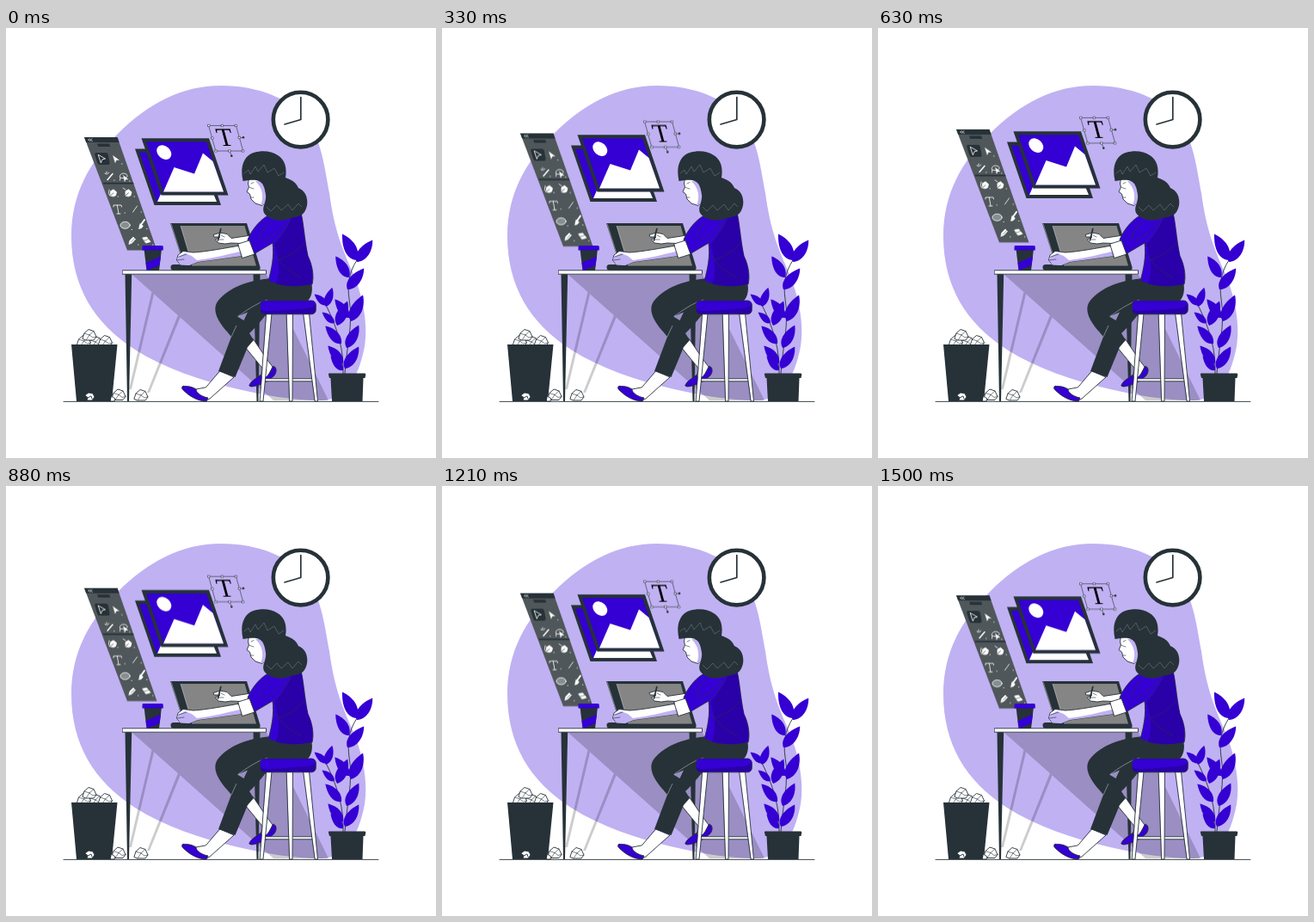
Animation of 500 by 500 pixels, one loop 1.54 s. Source, as an HTML page:

```html
<!DOCTYPE html>
<html lang="en">
<head>
<meta charset="utf-8">
<title>Designer at work</title>
<style>
  html, body { margin: 0; width: 100%; height: 100%; overflow: hidden; background: #fff; }
  svg { display: block; width: 100vw; height: 100vh; }
  .ink { fill: #263238; }
  .hue { fill: #3500d3; }
  .deep { fill: #2a00a9; }
  .pale { fill: #c0b1f3; }
  .white { fill: #fff; }
  .line { stroke: #263238; stroke-width: .9; stroke-linejoin: round; stroke-linecap: round; }
  .fine { stroke-width: .6; }
  .bold { stroke-width: 1.7; }
  .open { fill: none; }
  .shade { fill: #000; fill-opacity: .2; }
  .icons { fill: none; stroke: #fff; stroke-width: .8; stroke-linejoin: round; stroke-linecap: round; }
  .solid { fill: #fff; }
  .float { --rise: -9.3px; animation: float 1540ms infinite; }
  .short { --rise: -8.2px; }
  @keyframes float {
    0% { transform: translateY(0); animation-timing-function: cubic-bezier(.39, 0, .55, 1); }
    45.6% { transform: translateY(var(--rise)); animation-timing-function: cubic-bezier(.42, 0, .58, 1); }
    97.4%, 100% { transform: translateY(.2px); }
  }
</style>
</head>
<body>
<svg viewBox="0 0 500 500" xmlns="http://www.w3.org/2000/svg">
  <defs>
    <path id="leaf" d="M0 0C-9 -5 -9 -18 -1 -32C7 -22 9 -8 0 0Z"/>
    <g id="paper">
      <path class="white line" d="M-8 4L-6 -2L-1 -6.5L5 -4.5L8 2L5 6H-4Z"/>
      <path class="open line fine" d="M-6 -2L0 0L5 -4.5M0 0L-4 6M0 0L4 3L8 2"/>
    </g>
    <rect id="knob" class="white line fine" x="-1.1" y="-1.1" width="2.2" height="2.2"/>
    <g id="nib">
      <path class="solid" d="M-3.5 3L-3.5 -2L0 -4L3.5 -1L2.5 3L0 4Z"/>
      <path stroke="#50575a" d="M-3.5 3L0 0"/>
    </g>
  </defs>

  <path class="pale" d="M76 242C76 192 98 155 130 123C165 88 204 67 250 67C293 67 333 82 353 112C368 136 371 166 376 192C382 236 391 256 403 284C416 314 421 347 417 370C410 408 393 433 367 433C334 433 300 427 270 420C226 410 185 396 150 374C102 343 76 300 76 242Z"/>
  <path class="shade" d="M147 287H303L375 433H311Z"/>
  <path class="shade" d="M169.5 307L172 309.5L146 420H143ZM200 334L202.5 336.5L167 424H164Z"/>
  <path class="open line" d="M67 434.4H433"/>

  <!-- clock -->
  <circle class="white" cx="342.6" cy="106.6" r="31.8" stroke="#263238" stroke-width="4.6"/>
  <path class="open line bold" d="M342.8 80.5V106.5L324 112"/>

  <!-- tool panel -->
  <g class="float">
    <path fill="#50575a" d="M91 127H129.5L175.5 258.5H141Z"/>
    <path class="ink" d="M91 127H129.5L131.6 133H93.2ZM106 134.5H120L121.3 138H107.3ZM112.5 179.7H148L148.6 181.4H113.2Z"/>
    <path class="ink" d="M105 145H116Q118 145 118.8 147L120.5 156.5Q121 159 118 159H109Q107 159 106.3 157L103.3 147.5Q102.8 145 105 145Z"/>
    <g class="icons">
      <path stroke-width=".6" d="M97.5 128.8L95.5 130L98 131.5M100 128.8L98 130L100.5 131.5"/>
      <path d="M107.5 147.5L115.5 152L112 152.8L110.5 156.5Z"/>
      <path class="solid" d="M124.5 148.5L131.5 153.5L128.5 153.5L127 156.5Z" stroke-width=".3"/>
      <path stroke-width="1.5" d="M118 176.5L124 169.5"/>
      <path d="M115 169L117 170M117 167V169M119.5 168L118.5 169.5"/>
      <path d="M132.5 174C131 169.5 137 167.5 140.5 170.5C143 174 137 175.5 133 174L132.5 177"/>
      <path class="solid" d="M136.5 171.5L142 176L139.3 176L138 178.5Z" stroke-width=".3"/>
      <use href="#nib" x="125" y="191.8"/>
      <use href="#nib" x="142.5" y="191.8"/>
      <path d="M120 188Q118.500 192 120.500 195M139 188L136 186"/>
      <path d="M125 208V206H134L134.500 208M129.300 206L131 216M129 216H133"/>
      <path d="M147.500 214L152.500 207"/>
      <ellipse cx="138.600" cy="229.300" rx="5.600" ry="4" fill="#888e90"/>
      <path stroke-width="2" d="M157.500 228L161 223"/>
      <path class="solid" d="M156 227.500L159.500 230C158.500 233 156 233.500 154 233.500C155.500 232 154.500 229 156 227.500Z" stroke-width=".3"/>
      <path class="solid" d="M143 251L144 247L148 243L150.500 245.500L146.500 250Z"/>
      <path stroke="#50575a" stroke-width=".6" d="M145.500 249L149.500 244.500"/>
      <path class="solid" d="M159 244L163.500 243L168 248.500L163 250Z"/>
      <path stroke="#50575a" stroke-width=".6" d="M161 247L166 245.500"/>
      <path d="M134.500 158H135M125.500 177H126M143.500 178H144M130 196H130.500M149 196H149.500M138 215H138.500M157 214H157.500M146 234.500H146.500M163.500 233.500H164M153.500 252H154M170.500 252H171"/>
    </g>
  </g>

  <!-- pictures -->
  <g class="float short">
    <path class="ink" d="M150 140.500H228L250 206H172.500Z"/>
    <path class="hue" d="M155 144.500H225L244.500 202H175Z"/>
    <path class="white" d="M176 202L183 186L240 190L245 202Z"/>
    <path class="ink" d="M157.500 128.300H236L258.500 194.500H180.500Z"/>
    <path class="hue" d="M163 132.300H233L253 190.500H183Z"/>
    <path class="white" d="M183 190.500L195.500 162L219 169.500L229 145.500L240.500 155L253 190.500Z"/>
    <ellipse class="white" cx="183.800" cy="144.600" rx="9.500" ry="7.200" transform="rotate(42 183.800 144.600)"/>
  </g>

  <!-- type box -->
  <g class="float">
    <path class="open line fine" d="M236 113.500H267.500L275.700 143H244.200ZM271.500 127.500H275M260 143L262 148"/>
    <text transform="translate(248 137) skewX(15)" font-family="'Liberation Serif', serif" font-size="30">T</text>
    <use href="#knob" x="236" y="113.500"/><use href="#knob" x="251.500" y="113.500"/><use href="#knob" x="267.500" y="113.500"/>
    <use href="#knob" x="240" y="128"/><use href="#knob" x="244.200" y="143"/>
    <use href="#knob" x="260" y="143"/><use href="#knob" x="275.700" y="143"/><use href="#knob" x="271.500" y="127.500"/>
    <circle class="ink" cx="276" cy="127.300" r="1.300"/><circle class="ink" cx="262.300" cy="148.800" r="1.300"/>
  </g>

  <!-- bin and paper -->
  <use href="#paper" x="104" y="365"/><use href="#paper" x="90.500" y="364"/>
  <use href="#paper" x="115.500" y="364"/><use href="#paper" x="97" y="357"/>
  <path class="ink" d="M76 368H129.500L123 434H82Z"/>
  <path class="white line" d="M92 427L96 424L101 425L103 429L100 433H94L95 430Z"/>
  <path class="open line" d="M95 430L99 428L100 431"/>
  <use href="#paper" x="131" y="426.500"/><use href="#paper" x="157" y="427"/>
  <path class="white line" d="M122.500 428L127 431L126 434H121.500Z"/>

  <!-- plant -->
  <path class="open line" d="M394 402C396 370 404 345 399 315C397 300 398 285 408 270M392 402C393 375 386 350 372 322"/>
  <g class="hue" id="leaves"></g>
  <path class="ink" d="M375.500 401.500H417Q418.500 401.500 418.300 403L417.500 407H415.500L414.500 434H379L377.500 407H376L375 403Q374.800 401.500 375.500 401.500Z"/>

  <!-- desk -->
  <path class="ink" d="M138.500 286H146.200L143 434H141ZM287.500 286H295.500L293.500 434H291.500Z"/>
  <path class="ink" d="M191 227H280L295.500 278Q296 282 293 282H195Q191.500 282 191.500 278Q191.500 275 195 275H206.500Z"/>
  <path fill="#858585" d="M203 230H277.500L291 276.500H217Z"/>
  <path class="open" stroke="#fff" stroke-width=".4" d="M192 227.500L207 275M203 230L217 276.500"/>
  <rect class="white line" x="135.500" y="281.800" width="167" height="4.400"/>
  <path class="ink" d="M160.500 257H181L178 282H163.500Z"/>
  <path class="hue" d="M159.500 253H181.500Q182.800 253 182.800 255V258.500H158.500V255Q158.500 253 159.500 253ZM162.500 273L180 265.500L178.500 276L164 282Z"/>

  <!-- far foot -->
  <path class="white line" d="M276 368L287 361L304 386L310 394L304 406L295 408L299 397Z"/>
  <path class="hue line" d="M283 415.500C284 411 290 408 296 403.500C298 408 302 408 306 402L311 393C315 395 315 400 312 404C305 411 295 416 286 417Q282.500 417 283 415.500Z"/>

  <!-- near foot -->
  <path class="white line" d="M249 399L265 406L237 431L231 434L216 427L221 420L232 418Z"/>
  <path class="hue line" d="M206 416.500C213 416 218 418 221 420C221 425 229 429 235 430L233 434C223 434 213 428 206 421C204 419 204 417 206 416.500Z"/>

  <!-- trousers -->
  <path class="ink" fill-rule="evenodd" d="M309 291C285 293 260 300 246 318C239 328 247 342 257 353L262 359L247 399L266.500 406L281 371L288 363L283 355C293 346 301 334 312 323L350 318C356 313 357 303 355 296ZM269 335.500L281 330.500L276.500 340Z"/>
  <path class="open" stroke="#fff" stroke-width=".4" d="M270 335C279 329 291 320 304 316M262 359L268 346"/>

  <!-- stool -->
  <g class="white line">
    <path d="M299 407.800H358V410.800H299Z"/>
    <path d="M303 332H309L299 434H295.500Z"/>
    <path d="M326.500 332H333.500L333 434H330Z"/>
    <path d="M346 332H352.500L362.500 434H359.500Z"/>
  </g>
  <rect class="deep line" x="295.300" y="317" width="65" height="15.800" rx="5"/>
  <path class="hue" d="M300 317.500H355Q360 317.500 360 321Q357 325 350 326L310 329Q300 330 296 327V322Q296 317.500 300 317.500Z"/>

  <!-- far arm and pen -->
  <path class="white line" d="M285 241L262 244.500L257 239.500L249 238L241 240.500L242 243L249 243L243.500 246L247 250L255 251L262 250L284 251Z"/>
  <path class="open line fine" d="M250 241L254 243M248 246L253 246"/>
  <path class="open line bold" d="M249.800 233.500L246.500 247"/>

  <!-- shirt -->
  <path class="white line" d="M304 205L319 207L323 219L309 223Z"/>
  <path class="hue line" d="M303 219C292 226 285 237 281 246L288 263L310 250C312 265 309 280 305 294C320 301 340 302 356 298C358 290 357 277 351 265C347 246 346 226 343 215L327 210Z"/>
  <path class="deep" d="M334 213L343 216C346 230 347 247 351 265C357 278 357 290 355.500 297.500C343 301 328 301 314 297.500C319 284 318 268 312 252C321 241 331 228 334 213Z"/>
  <path class="open line fine" d="M310 250C318 243 328 232 334 216M306 226C299 233 296 239 295 246M326 226C318 236 308 243 300 247M313 264C319 275 331 285 343 290M347 250C339 260 328 266 316 270"/>

  <!-- near arm -->
  <path class="white line" d="M272 253C254 256 234 260 218 261L206 259.500L200 264L198.500 270L203 275.500L213 276L223 272L274 265Z"/>
  <path class="pale" d="M200 266L208 262L216 265L222 270C240 268 258 263 272 260L274 265L223 272L213 276L203 275.500L199 270Z"/>
  <path class="open line fine" d="M201 266L210 263M199 270L207 269"/>
  <path class="white line" d="M270 251L283 247L289 263L275 267.500Z"/>

  <!-- head -->
  <path class="white line" d="M283 172L281.500 181L282.500 185L280 190.500L283.500 193L285 199L290 204L298 206.500L304 200V174Z"/>
  <path class="pale" d="M290 178L302 176V204L296 206C300 198 299 186 290 178Z"/>
  <path class="open line fine" d="M283.500 185.500L288 187M285 181L288 179.500M285 197L288 197"/>
  <path class="ink" d="M275.500 178C273 166 274 156 281 149C288 142 307 141 316 148C324 153 327 162 325 174C334 177 338 181 340 186C351 190 353 205 347 214C342 221 335 219 328 222C318 226 304 222 300 215C297 209 303 203 302 194C301 186 299 180 294 178C289 176 284 177 275.500 178Z"/>
  <path class="open" stroke="#7d868a" stroke-width=".5" d="M277 169L282 165L284 170L290 161L293 167L300 159L304 168L312 163L317 172L323 168M303 208L308 213L315 206L320 212L328 205L333 212L340 204L344 208"/>
</svg>
<script>
  // tip x, tip y, base x, base y
  const leaves = [
    [392, 239, 408, 270], [427, 247, 408, 272], [384, 265, 399, 290], [417, 280, 397, 304],
    [383, 315, 399, 337], [416, 311, 401, 341], [359, 309, 373, 322], [380, 302, 372, 324],
    [368, 330, 382, 343], [398, 318, 385, 346], [372, 346, 390, 367], [411, 346, 396, 372],
    [375, 369, 392, 390], [411, 371, 394, 396], [378, 381, 392, 398]
  ];
  document.getElementById('leaves').innerHTML = leaves.map(([tx, ty, x, y]) => {
    const dx = tx - x, dy = ty - y;
    const turn = Math.atan2(dx, -dy) * 180 / Math.PI;
    return `<use href="#leaf" transform="translate(${x} ${y}) rotate(${turn}) scale(${Math.hypot(dx, dy) / 32})"/>`;
  }).join('');
</script>
</body>
</html>
```
